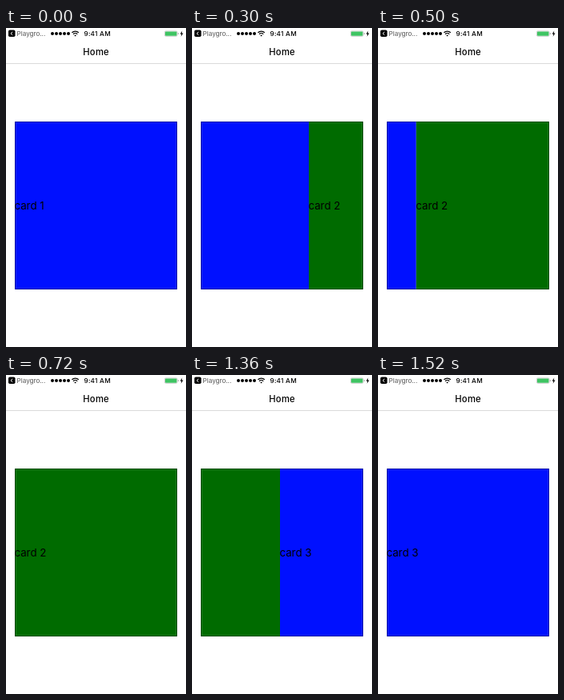
These frames come from a looping animation (225x399 px, 1600 ms). An HTML page:

```html
<!DOCTYPE html>
<html lang="en">
<head>
<meta charset="utf-8">
<title>Card swiper</title>
<style>
  html, body { margin: 0; width: 100%; height: 100%; overflow: hidden; background: #fff; }
  svg { display: block; width: 100vw; height: 100vh; }
  text { font-family: Inter, Roboto, sans-serif; }
  #cards text { font-size: 13.3px; }
</style>
</head>
<body>
<svg viewBox="0 0 225 399">
  <clipPath id="window"><rect x="11" y="117" width="203" height="210"/></clipPath>

  <rect y="44" width="225" height="1" fill="#dadada"/>

  <rect x="3" y="2.5" width="8.5" height="8.5" rx="1.8"/>
  <path d="M8.2 4.7 6 6.8 8.2 8.9" fill="none" stroke="#fff" stroke-width="1"/>
  <text x="13.6" y="10" font-size="8.1" fill="#555">Playgro...</text>
  <path d="M58 7h20.5" stroke="#000" stroke-width="4" stroke-linecap="round" stroke-dasharray="0 5"/>
  <g fill="none" stroke="#000" stroke-width="1.2">
    <path d="M82.4 5.8a6 6 0 0 1 8.4 0M84 7.7a3.7 3.7 0 0 1 5.2 0"/>
    <path d="M86.6 8.6l-1.3 .7 1.3 1.3 1.3-1.3z" fill="#000" stroke="none"/>
  </g>
  <text x="114.2" y="10" font-size="8.2" font-weight="500" letter-spacing=".25" text-anchor="middle">9:41 AM</text>
  <rect x="198.4" y="3.9" width="15.6" height="6.4" rx="1.3" fill="#fff" stroke="#aaa" stroke-width=".6"/>
  <rect x="199" y="4.5" width="14.4" height="5.2" rx=".7" fill="#3fc463"/>
  <path d="M214.9 6v2.2q.9-.3.9-1.1T214.9 6" fill="#888"/>
  <path d="M220.3 3.5 217.6 7.5h1.7l-.6 3.2 2.8-4.2h-1.8z"/>

  <text x="112.6" y="33.6" font-size="11.2" font-weight="500" letter-spacing=".3" text-anchor="middle">Home</text>

  <g clip-path="url(#window)"><g id="cards"></g></g>
  <rect x="11.5" y="117.5" width="202" height="209" fill="none" stroke="#000" stroke-opacity=".35"/>
  <rect x="12.5" y="118.5" width="200" height="207" fill="none" stroke="#fff" stroke-opacity=".1"/>
</svg>
<script>
const LOOP = 1600, STEP = 20, SIZE = 210;
const BLUE = '#0010ff', GREEN = '#006b00';

// Scroll position of the strip: [ms, px, px per ms]
const drag = [
  [100, 0, .3], [300, 75, .1], [340, 75, 0], [580, SIZE, .05],
  [1200, SIZE, .4], [1360, SIZE + 111, .85], [1520, 2 * SIZE, .1]
];

const cards = document.getElementById('cards');
cards.innerHTML = [BLUE, GREEN, BLUE].map((color, i) => `
  <g transform="translate(${11 + i * SIZE} 117)">
    <rect width="${SIZE}" height="${SIZE}" fill="${color}"/>
    <text x="-.6" y="110">card ${i + 1}</text>
  </g>`).join('');

function scrollAt(t) {
  const next = drag.findIndex(p => p[0] > t);
  if (next === 0) return 0;
  if (next < 0) return 2 * SIZE;
  const [t0, s0, v0] = drag[next - 1], [t1, s1, v1] = drag[next];
  if (s0 === s1) return s0;
  const d = t1 - t0, u = (t - t0) / d, w = 1 - u;
  return s0 + (s1 - s0) * u * u * (3 - 2 * u) + d * u * w * (v0 * w - v1 * u);
}

function draw() {
  const t = Math.floor(performance.now() % LOOP / STEP) * STEP;
  cards.setAttribute('transform', `translate(${-scrollAt(t)} 0)`);
  requestAnimationFrame(draw);
}
draw();
</script>
</body>
</html>
```
